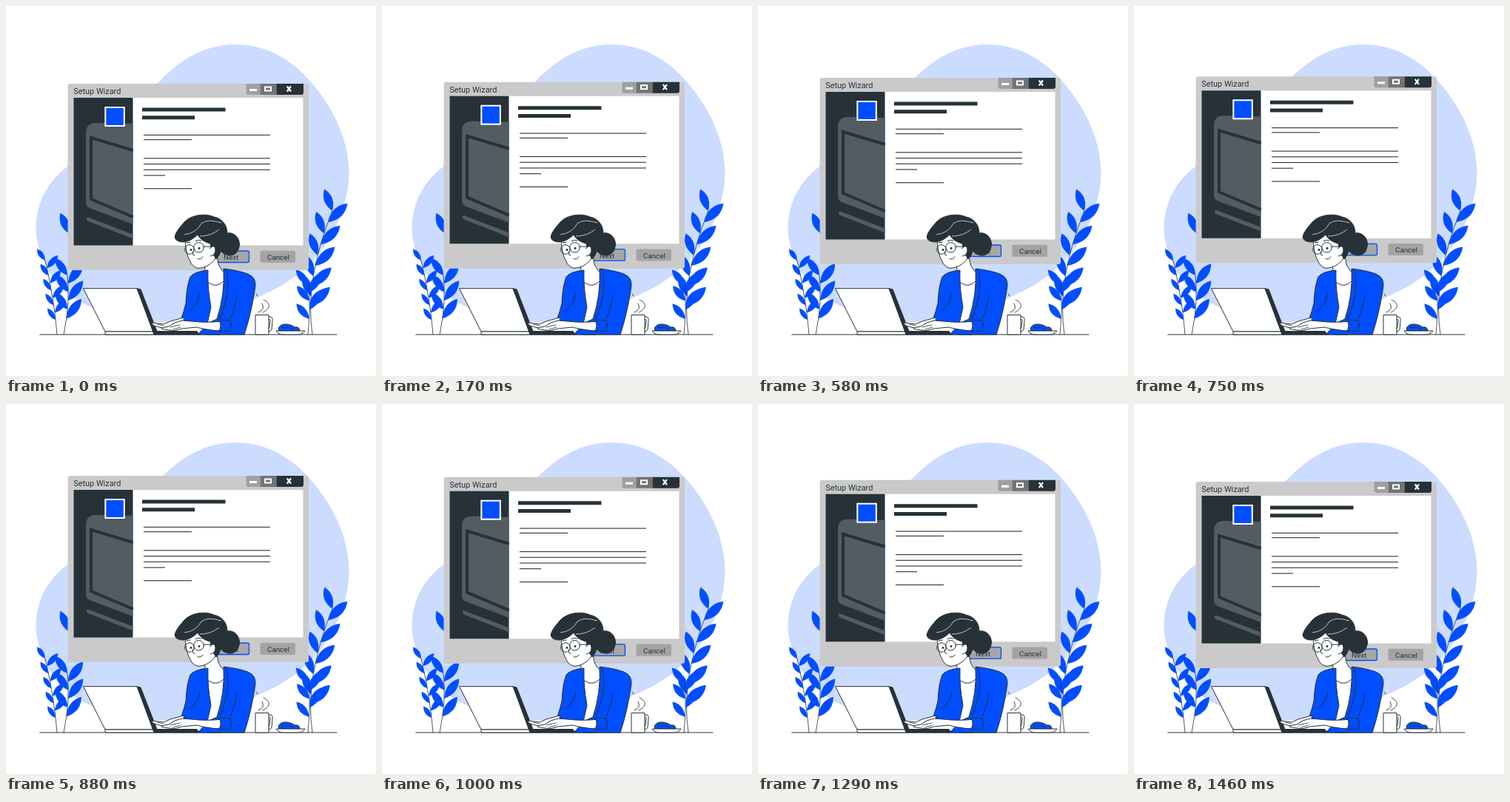
These frames come from a looping animation (500 by 500 pixels, 1.5 s). An HTML page:

```html
<!DOCTYPE html>
<html lang="en">
<head>
<meta charset="utf-8">
<title>Setup Wizard</title>
<style>
  html, body { margin: 0; width: 100%; height: 100%; overflow: hidden; background: #fff; }
  svg { display: block; width: 100%; height: 100%; font-family: Roboto, sans-serif; }
  .dark { fill: #263238; }
  .blue { fill: #004eff; }
  .white { fill: #fff; }
  .line { fill: none; stroke: #263238; stroke-linecap: round; stroke-linejoin: round; }
  .shape { stroke: #263238; stroke-linejoin: round; }
</style>
</head>
<body>
<svg viewBox="0 0 500 500">
  <path fill="#ccdcff" d="M310 52C350 52 382 70 408 98C441 134 464 181 463.500 227C463 258 452 289 436 316C420 342 398 363 368 380C342 394 300 413 262 421C228 430 185 429 150 420C116 411 78 392 60 362C44 335 37 306 42 283C47 254 62 231 90 212C142 177 157 154 205 104C233 75 266 52 310 52Z"/>

  <g id="plants" class="blue"></g>

  <g id="window">
    <rect x="83.500" y="105" width="325.500" height="252" rx="3" fill="#cacaca"/>
    <text class="dark" x="91.300" y="118.800" font-size="10.900">Setup Wizard</text>
    <path fill="#a0a0a0" d="M324.500 105H343.500V120H327.500Q324.500 120 324.500 117Z"/>
    <path fill="#737373" d="M343.500 105H365.500V120H343.500Z"/>
    <path class="dark" d="M365.500 105H402V117Q402 120 399 120H365.500Z"/>
    <path class="white" d="M329 112h10v3h-10z"/>
    <rect x="350" y="109.500" width="8" height="5" fill="none" stroke="#fff" stroke-width="2"/>
    <path fill="none" stroke="#fff" stroke-width="2.200" d="M379.800 108.500l5.200 7m0-7l-5.200 7"/>

    <rect class="white" x="171" y="124" width="230.500" height="199.500"/>
    <rect class="dark" x="91.500" y="124" width="80" height="199.500"/>
    <g fill="#535c61">
      <path d="M171.500 159L121 158Q108 158 108 172V265Q108 271 113 273L171.500 295Z"/>
      <path fill="none" stroke="#263238" stroke-width="4" d="M171.500 195L115 178V261L171.500 285"/>
      <path d="M111 285.500L171.500 308.500V314.500L110 290.500Q107 286 111 285.500Z"/>
    </g>
    <rect class="blue" x="134.300" y="137" width="25.500" height="25" stroke="#fff" stroke-width="2"/>

    <path class="dark" d="M184 137.500h112.500v5H184zM184 148.300h71v5H184z"/>
    <g id="copy" class="dark"></g>

    <rect x="281" y="331" width="47.500" height="15.500" rx="2" fill="#a6a6a6" stroke="#004eff" stroke-width="1.300"/>
    <rect x="343.500" y="330.700" width="47.500" height="16" rx="2" fill="#a3a3a3"/>
    <g class="dark" font-size="9.800">
      <text x="294" y="342.800">Next</text>
      <text x="353" y="342.800">Cancel</text>
    </g>
  </g>

  <path class="line" d="M45.500 444H447"/>

  <g id="woman" class="shape">
    <path class="white" d="M268 350L286 333Q284 347 291 356L299 364L290 444H272L270 362Z"/>
    <path class="line" d="M274 374Q284 382 294 372"/>
    <path class="blue" d="M273 357Q254 359 249 366Q244 378 243 402Q240 414 237 422Q250 433 271 434L277 407Q272 380 273 357Z"/>
    <path class="blue" d="M294 355Q313 357 327 362Q338 367 337 378C334 400 329 423 322 444H259L274 428L285 423Q296 390 294 355Z"/>
    <path class="line" d="M297 357Q306 381 289 422M302 425Q309 411 312 391M248 412Q260 403 262 388"/>
    <path class="white" d="M242 316C243 332 246 341 251 349Q257 357 267 353Q278 350 285 338L281 308L256 304Z"/>
    <path class="dark" d="M228 312C230 304 236 298 241 292C249 283 268 279 281 285C292 287 299 296 299 307C308 305 315.500 313 315.500 322C315 332 309 338 301 337Q294 336 290 331Q289 337 284 342Q277 333 276 321C268 319 262 315 259 309Q250 318 240 319Q229 319 228 312Z"/>
    <path fill="none" stroke="#fff" stroke-width=".7" d="M241 309Q257 307 264 294Q272 287 291 293M262 311Q277 311 288 302"/>
    <path class="white" d="M275 328Q282 321 283 329Q283 337 276 338"/>
    <g class="line">
      <circle cx="248" cy="329" r="6.300"/>
      <circle cx="260.500" cy="326.300" r="6.800"/>
      <path d="M267.500 325L277 325M253 331Q251 338 255 337M259 341.500Q263 343.500 266 339M244 320L249 319M256 317.500Q260 315 264 317"/>
    </g>
    <g class="dark" stroke="none">
      <circle cx="250" cy="329.500" r="1.400"/>
      <circle cx="261" cy="327.500" r="1.400"/>
    </g>
  </g>

  <g id="laptop" class="shape">
    <path class="white" d="M104.500 381.700H177L201 440H134Z"/>
    <path class="white" d="M134 440H201V444H134Z"/>
    <path class="dark" d="M177 381.700L182 383L204 439.500H258L261 444H200Z"/>
  </g>

  <g id="hands" class="shape">
    <path class="white" d="M240 421L222 426L213 430L198 428Q196 430 200 432L211 435L228 433L241 431Z"/>
    <path class="white" d="M302 425Q279 428 262 427L238 425Q227 427 220 433L210 435Q209 437 214 437L220 438Q228 440 238 436L257 434Q280 440 302 439Z"/>
    <path class="line" stroke-width=".8" d="M222 434L235 431M226 437L236 434M204 430L213 432"/>
    <path class="blue" d="M288 424L303 425Q306 433 302 440L288 439Q292 432 288 424Z"/>
  </g>

  <g id="coffee" class="shape">
    <path class="white" d="M354 420H358Q361 421 360 426L359 437Q358 440 354 440V437Q356 437 356 434L357 425Q357 423 354 423Z"/>
    <path class="white" d="M337 417.500H355V444H337Z"/>
    <path class="line" stroke-width=".9" d="M347 414C359 408 357 401 348 397M341 414Q351 410 346 402M338 389L340 392"/>
  </g>

  <g id="snack" class="shape">
    <path class="blue" d="M368 437Q369 429 380 430Q387 431 390 434Q397 433 397 439H369Z"/>
    <path class="line" d="M373 434Q377 436 381 434Q386 435 388 438"/>
    <path class="white" d="M365 439H404Q401 444 394 444H375Q368 444 365 439Z"/>
  </g>
</svg>
<script>
  const el = id => document.getElementById(id);
  const rad = degrees => degrees * Math.PI / 180;

  function leaf(x, y, length, angle) {
    const dx = length * Math.cos(angle), dy = length * Math.sin(angle);
    const bulge = s => `${x + dx * .53 - dy * s},${y + dy * .53 + dx * s}`;
    return `<path d="M${x},${y}Q${bulge(.36)} ${x + dx},${y + dy}Q${bulge(-.36)} ${x},${y}Z"/>`;
  }

  // Leaves alternate left and right down a curved stem, at equal steps from its top
  function plant({ root, bend, top, count, step, length, lean, spread }) {
    const along = (t, i) => (1 - t) ** 2 * root[i] + 2 * t * (1 - t) * bend[i] + t * t * top[i];
    let svg = `<path class="line" stroke-width=".8" d="M${root}Q${bend} ${top}"/>`;
    for (let i = 0; i < count; i++) {
      const t = 1 - i * step, side = i % 2 ? 1 : -1;
      svg += leaf(along(t, 0), along(t, 1), length * (1 + .08 * side), rad(lean + side * spread));
    }
    return svg;
  }

  el('plants').innerHTML = leaf(86, 308, 31, rad(-114)) + [
    { root: [414, 444], bend: [403, 370], top: [441, 277], count: 10, step: .083, length: 34, lean: -77, spread: 33 },
    { root: [408, 444], bend: [412, 405], top: [409, 377], count: 5, step: .18, length: 29, lean: -95, spread: 35 },
    { root: [69, 444], bend: [65, 395], top: [53, 344], count: 9, step: .1, length: 21, lean: -87, spread: 38 },
    { root: [78, 444], bend: [87, 400], top: [83, 364], count: 6, step: .15, length: 31, lean: -89, spread: 36 }
  ].map(plant).join('');

  // Paragraphs of placeholder text: first line, number of lines, width of the last
  const paragraph = (y, lines, last) => Array.from({ length: lines }, (_, i) =>
    `<rect x="186" y="${y + i * 7.7}" width="${i < lines - 1 ? 171 : last}" height="1.1"/>`).join('');
  el('copy').innerHTML = paragraph(173.8, 1, 171) + paragraph(180.1, 1, 65)
    + paragraph(205.3, 4, 29) + paragraph(246.2, 1, 65);

  const LOOP = 1500, FRAMES = 36, LIFT = 10;

  function draw(now) {
    // The window floats up and down at constant speed, 24 steps a second
    const frame = Math.floor((now % LOOP + 4) * FRAMES / LOOP) % FRAMES;
    const rise = LIFT * (1 - Math.abs(2 * frame / (FRAMES - 1) - 1));
    el('window').setAttribute('transform', `translate(0 ${-rise})`);
    requestAnimationFrame(draw);
  }
  draw(performance.now());
</script>
</body>
</html>
```
